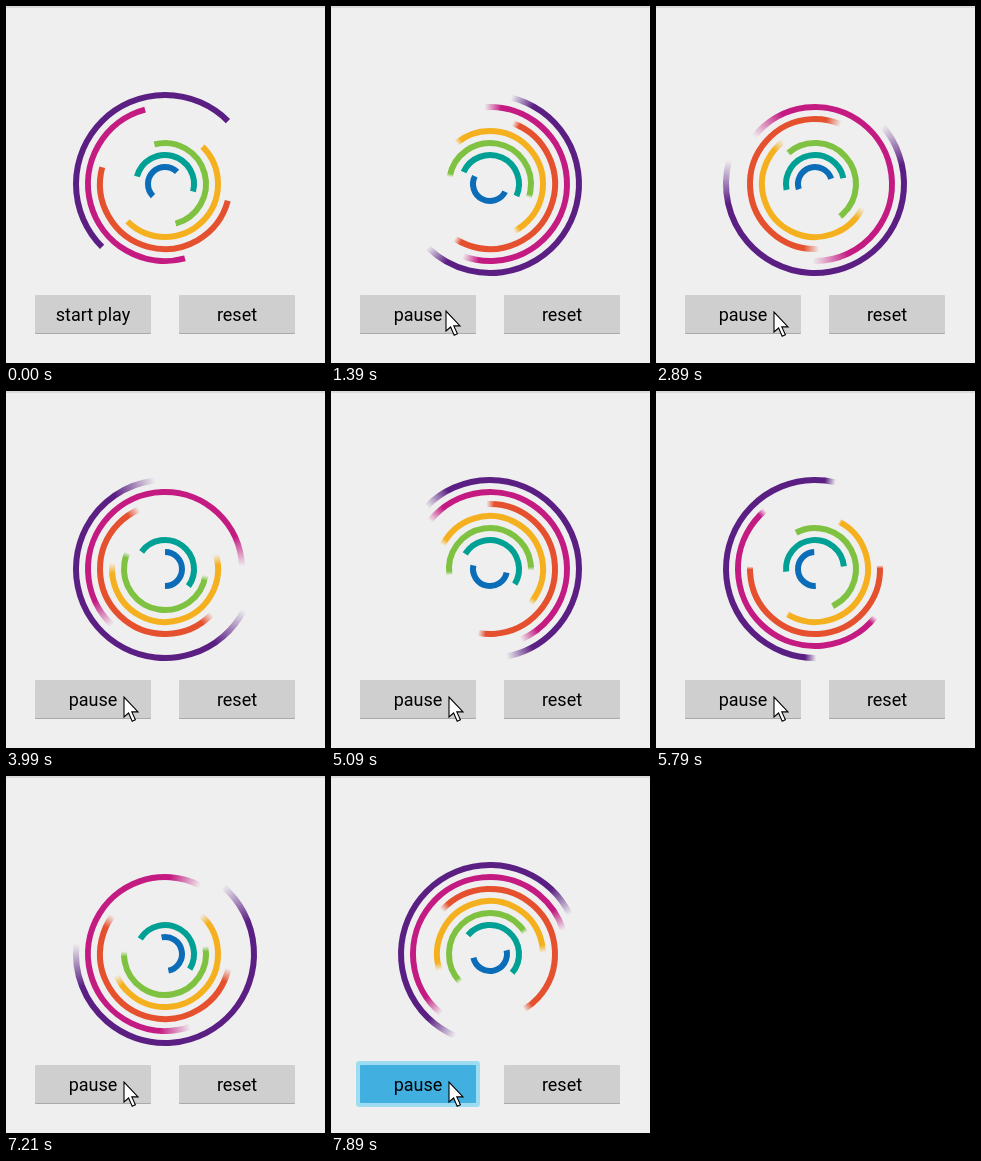
These frames come from a looping animation (319 px wide and 357 px high, 7.99 s). An HTML page with a canvas:

```html
<!DOCTYPE html>
<html lang="en">
<head>
<meta charset="utf-8">
<title>Spinning rings</title>
<style>
  html, body { margin: 0; width: 100%; height: 100%; overflow: hidden; background: #efefef; }
  #stage { position: relative; width: 319px; height: 357px; overflow: hidden; }
  #stage::before { content: ""; position: absolute; inset: 0 0 auto; height: 2px; background: #dadada; }
  canvas, svg { position: absolute; left: 0; top: 0; }
  .button {
    position: absolute; top: 289px; width: 116px; height: 38px; border-radius: 1px;
    background: #cfcfcf; box-shadow: 0 1px #a9a9a9;
    font: 18px/40px Roboto, sans-serif; text-align: center; color: #000;
  }
  #play { left: 29px; }
  #reset { left: 173px; }
  .pressed { background: #41b0e1; box-shadow: 0 0 0 4px #9edcf1; }
</style>
</head>
<body>
<div id="stage">
  <canvas id="rings" width="319" height="357"></canvas>
  <div id="play" class="button">start play</div>
  <div id="reset" class="button">reset</div>
  <svg id="cursor" width="18" height="28" viewBox="-1 -1 18 28">
    <path d="M0 0V20L4.6 16L8.2 24.3L11.4 22.8L7.8 14.9H14Z" fill="#fff" stroke="#000" stroke-width="1.1"/>
  </svg>
</div>
<script>
const LOOP = 7990, PLAY_AT = 1150;
const CENTER = { x: 159, y: 178 };
const MAX_BLUR = 28, BLUR_PER_SPEED = 0.012;

const easeOut = turns => p => 360 * turns * Math.sin(p * Math.PI / 2);
const swing = p => -30 * Math.cos(p * 2 * Math.PI);
const backSpin = p => {
  const q = 1 - p;
  return -360 * q * q * (1.72 + 0.96 * q - 1.59 * q * q);
};

// Outermost ring first; spin gives degrees over one cycle.
const rings = [
  { rgb: "91,31,131", spin: easeOut(5), blurs: true },
  { rgb: "196,27,130", spin: easeOut(4), blurs: true },
  { rgb: "229,80,46", spin: easeOut(2), blurs: true },
  { rgb: "245,176,31", spin: easeOut(2), blurs: true },
  { rgb: "127,194,65", spin: backSpin, blurs: true },
  { rgb: "0,160,148", spin: swing },
  { rgb: "11,109,183", spin: p => 360 * p }
];

// [time, value, ...] tables
const cycles = [[1150, .636], [1390, .7], [2890, 1.075], [3990, 1.375],
  [5090, 1.658], [6410, 2.053], [7890, 2.589], [7990, 2.625]];
const cursorPath = [[100, 250, 346], [470, 150, 334], [840, 76, 315], [1040, 110, 307],
  [1390, 115, 305], [1900, 115, 305], [2300, 118, 306], [7990, 118, 306]];
const presses = [[1000, 1150], [7840, 7990]];

const canvas = document.getElementById("rings");
const ctx = canvas.getContext("2d");
const play = document.getElementById("play");
const cursor = document.getElementById("cursor");
const rad = deg => deg * Math.PI / 180;

function sample(table, t) {
  let i = 1;
  while (i < table.length - 1 && table[i][0] < t) i++;
  const [a, b] = [table[i - 1], table[i]];
  const k = Math.min(1, Math.max(0, (t - a[0]) / (b[0] - a[0])));
  return a.slice(1).map((v, n) => v + (b[n + 1] - v) * k);
}

function speed(spin, p) {
  const step = 0.002;
  return Math.abs(spin(p + step) - spin(p - step)) / (2 * step);
}

function drawRing(ring, index, phase) {
  const { x, y } = CENTER;
  const running = phase !== null;
  const blur = running && ring.blurs
    ? Math.min(MAX_BLUR, speed(ring.spin, phase) * BLUR_PER_SPEED) : 0;
  const start = 135 - 60 * index + (running ? ring.spin(phase) : 0) - blur;
  const sweep = 180 + 2 * blur;
  const solid = `rgb(${ring.rgb})`, clear = `rgba(${ring.rgb},0)`;
  ctx.strokeStyle = solid;
  if (blur > 0.5) {
    const fade = ctx.createConicGradient(rad(start), x, y);
    fade.addColorStop(0, clear);
    fade.addColorStop(blur / 360, solid);
    fade.addColorStop((blur + 180) / 360, solid);
    fade.addColorStop(sweep / 360, clear);
    fade.addColorStop(1, clear);
    ctx.strokeStyle = fade;
  }
  ctx.beginPath();
  ctx.arc(x, y, 89 - 12 * index, rad(start), rad(start + sweep));
  ctx.stroke();
}

function render(t) {
  const playing = t >= PLAY_AT;
  const phase = playing ? sample(cycles, t)[0] % 1 : null;
  ctx.clearRect(0, 0, canvas.width, canvas.height);
  ctx.lineWidth = 6;
  rings.forEach((ring, i) => drawRing(ring, i, phase));

  play.textContent = playing ? "pause" : "start play";
  play.classList.toggle("pressed", presses.some(([from, to]) => t >= from && t < to));

  const [cx, cy] = sample(cursorPath, t);
  cursor.style.visibility = t < 100 ? "hidden" : "visible";
  cursor.style.transform = `translate(${cx - 1}px, ${cy - 1}px)`;
}

const began = performance.now();
function tick() {
  render((performance.now() - began) % LOOP);
  requestAnimationFrame(tick);
}
tick();
</script>
</body>
</html>
```
